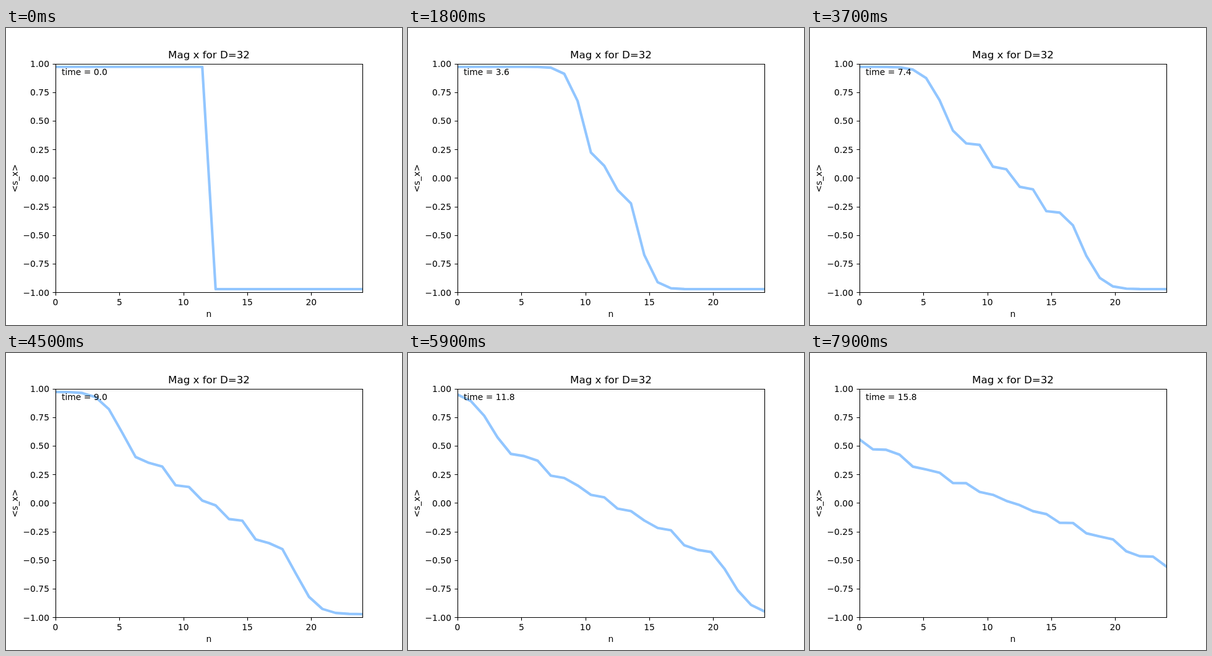
These frames come from a looping animation (640x480 px, 8000 ms). An HTML page with a canvas:

```html
<!DOCTYPE html>
<html lang="en">
<head>
<meta charset="utf-8">
<title>Mag x for D=32</title>
<style>
html, body { margin: 0; width: 100%; height: 100%; overflow: hidden; background: #fff; }
canvas { display: block; }
</style>
</head>
<body>
<canvas id="plot" width="640" height="480"></canvas>
<script>
const ctx = document.getElementById('plot').getContext('2d');
const LEFT = 80, RIGHT = 576, TOP = 57.6, BOTTOM = 427.2;
const SITES = 24, HALF = SITES / 2;
const AMPLITUDE = 0.972, SPEED = 0.9;
const STEP_MS = 100, STEPS = 80, STEP_TIME = 0.2;

const px = n => LEFT + n / 24 * (RIGHT - LEFT);
const py = m => TOP + (1 - m) / 2 * (BOTTOM - TOP);
const snap = v => Math.floor(v + 0.5) + 0.5;

// Bessel function J_l(x), averaged over one period of its integral form
function bessel(l, x) {
  const count = 96;
  let sum = 0;
  for (let i = 0; i < count; i++) {
    const a = 2 * Math.PI * i / count;
    sum += Math.cos(l * a - x * Math.sin(a));
  }
  return sum / count;
}

// Melting domain wall of a free-fermion chain, odd about its centre
function magnetization(time) {
  const right = [];
  let sum = 0;
  for (let l = 0; l < HALF; l++) {
    sum += (l ? 2 : 1) * bessel(l, SPEED * time) ** 2;
    right.push(-AMPLITUDE * sum);
  }
  return [...right.map(m => -m).reverse(), ...right];
}

function text(str, x, y, align = 'center', size = 13.889) {
  ctx.font = `${size}px "DejaVu Sans", sans-serif`;
  ctx.textAlign = align;
  ctx.fillText(str, x, y);
}

function drawCurve(time) {
  ctx.save();
  ctx.beginPath();
  ctx.rect(LEFT, TOP, RIGHT - LEFT, BOTTOM - TOP);
  ctx.clip();
  ctx.beginPath();
  magnetization(time).forEach((m, i) => ctx.lineTo(px(i * 24 / (SITES - 1)), py(m)));
  ctx.strokeStyle = '#92c6ff';
  ctx.lineWidth = 4.167;
  ctx.lineJoin = 'round';
  ctx.lineCap = 'square';
  ctx.stroke();
  ctx.restore();
}

function drawAxes() {
  ctx.strokeStyle = ctx.fillStyle = '#000';
  ctx.lineWidth = 1.11;
  ctx.beginPath();
  for (let n = 0; n <= 20; n += 5) {
    const x = snap(px(n));
    ctx.moveTo(x, 427.5);
    ctx.lineTo(x, 432.5);
    text(n, px(n), 448);
  }
  for (let m = -1; m <= 1; m += 0.25) {
    const y = snap(py(m));
    ctx.moveTo(75.5, y);
    ctx.lineTo(80.5, y);
    text(m.toFixed(2).replace('-', '\u2212'), 70, Math.round(py(m) + 5.3), 'right');
  }
  ctx.rect(80.5, 58.5, 496, 369);
  ctx.stroke();

  text('Mag x for D=32', 328, 49, 'center', 16.667);
  text('n', 328, 467);
  ctx.save();
  ctx.translate(19, 243);
  ctx.rotate(-Math.PI / 2);
  text('<s_x>', 0, 0);
  ctx.restore();
}

function frame(now) {
  const step = Math.floor(now / STEP_MS) % STEPS;
  const time = step * STEP_TIME;
  ctx.fillStyle = '#fff';
  ctx.fillRect(0, 0, 640, 480);
  drawCurve(time);
  drawAxes();
  text('time = ' + time.toFixed(1), 90, 76, 'left');
  requestAnimationFrame(frame);
}
requestAnimationFrame(frame);
</script>
</body>
</html>
```
